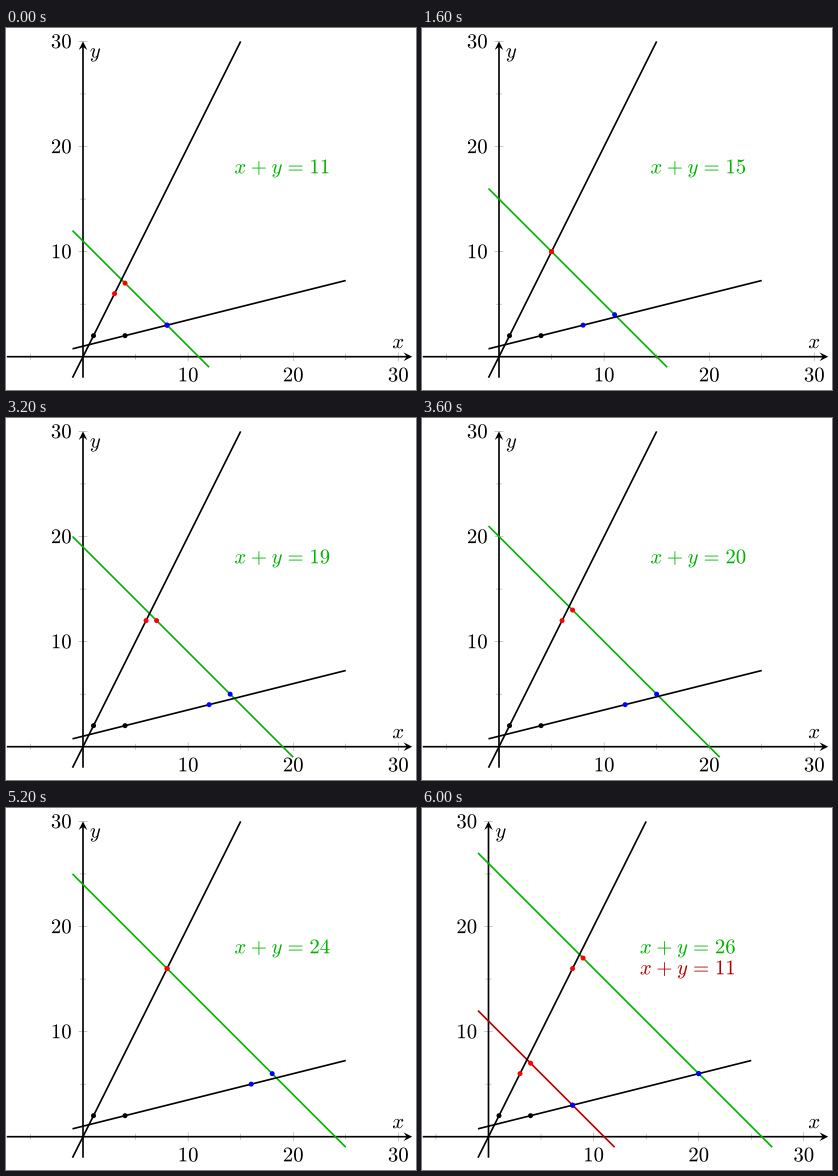
A matplotlib script for the animation above (6400 ms loop, 410 by 362 pixels).

```python
import math

import matplotlib.pyplot as plt
from matplotlib.animation import FuncAnimation
from matplotlib.patches import Circle, PathPatch, Polygon
from matplotlib.textpath import TextPath
from matplotlib.transforms import Affine2D

plt.rcParams["mathtext.fontset"] = "cm"

W, H, DPI = 410, 362, 64
UNIT = 10.51            # pixels per coordinate unit
ORIGIN_X, ORIGIN_Y = 77.0, 328.7
EM = 20.76              # font size in pixels
PT = EM / 10
THICK = 0.8 * PT
LEFT, RIGHT = 0.8, 406.2
GREEN, DARK_RED = "#00b200", "#b20000"
FIRST, LAST = 11, 26

fig = plt.figure(figsize=(W / DPI, H / DPI), dpi=DPI, facecolor="white")
ax = fig.add_axes([0, 0, 1, 1])


class Plane:
    """Maps coordinates to pixels and draws on the stage."""

    def __init__(self, x_max):
        # The view stays centred on the widest line.
        self.x0 = ORIGIN_X - max(0, x_max - 25) / 2 * UNIT

    def at(self, x, y):
        return self.x0 + x * UNIT, ORIGIN_Y - y * UNIT

    def stroke(self, p, q, color="black", width=THICK, z=2):
        ax.plot([p[0], q[0]], [p[1], q[1]], color=color, lw=width * 72 / DPI,
                solid_capstyle="butt", snap=False, zorder=z)

    def segment(self, p, q, color="black", z=3):
        self.stroke(self.at(*p), self.at(*q), color, z=z)

    def dot(self, x, y, color):
        ax.add_patch(Circle(self.at(x, y), 1.2 * PT, fc=color, lw=0, zorder=6))

    def text(self, left, base, s, color="black"):
        place = Affine2D().scale(1, -1).translate(left, base)
        path = TextPath((0, 0), f"${s}$", size=EM).transformed(place)
        ax.add_patch(PathPatch(path, fc=color, lw=0, zorder=5))

    def arrow_head(self, x, y, dx, dy):
        a = 0.52 * PT
        shape = [(0, 0), (-8, 4), (-5, 0), (-8, -4)]
        pts = [(x + a * (u * dx - v * dy), y + a * (u * dy + v * dx))
               for u, v in shape]
        ax.add_patch(Polygon(pts, fc="black", lw=0, zorder=2))

    def tick(self, value, vertical):
        major = value % 10 == 0
        half = (4.27 if major else 2.85) * PT / 2
        label_w, cap = EM, 0.644 * EM
        gap = 4.45 + 6.9
        if vertical:
            x, y = self.at(0, value)
            ends = (x - half, y), (x + half, y)
            left, base = x - gap - label_w, y + cap / 2
        else:
            x, y = self.at(value, 0)
            ends = (x, y - half), (x, y + half)
            left, base = x - label_w / 2, y + gap + cap
        self.stroke(*ends, color="#808080", width=0.2 * PT, z=1)
        if major:
            self.text(left, base, value)

    def axes(self):
        for v in (-5, 5, 10, 15, 20, 25, 30):
            self.tick(v, vertical=False)
            if v > 0:
                self.tick(v, vertical=True)
        top, bottom = self.at(0, 30), self.at(0, -2)
        self.stroke((LEFT, ORIGIN_Y), (RIGHT - 5, ORIGIN_Y))
        self.stroke(bottom, (top[0], top[1] + 5))
        self.arrow_head(RIGHT, ORIGIN_Y, 1, 0)
        self.arrow_head(*top, 0, -1)
        self.text(386.3, 320.2, "x")
        self.text(self.x0 + 6.9, 29.5, "y")

    def sum_line(self, n, color, label_y):
        self.segment((-1, n + 1), (n + 1, -1), color)
        x, y = self.at(19, label_y)
        thin, wide = r"\hspace{.053}", r"\hspace{.116}"
        label = f"x{thin}+{thin}y{wide}={wide}{n}"
        self.text(x - 2.327 * EM, y + 0.28 * EM, label, color)

    def lattice_points(self, n):
        k, j = n // 3, (n - 1) // 5
        up = math.ceil(n / 3)
        low = math.ceil((n + 4) / 5)
        for p in ((k, 2 * k), (up, n - up)):
            self.dot(*p, "red")
        for p in ((4 * j, j + 1), (n - low, low)):
            self.dot(*p, "blue")


def draw(i):
    n = FIRST + i
    ax.clear()
    ax.set(xlim=(0, W), ylim=(H, 0))
    ax.axis("off")

    plane = Plane(n + 1)
    plane.axes()
    plane.sum_line(n, GREEN, 18)
    if n == LAST:
        plane.sum_line(FIRST, DARK_RED, 16)
        plane.lattice_points(FIRST)
    plane.segment((-1, -2), (15, 30), z=4)
    plane.segment((-1, 0.75), (25, 7.25), z=4)
    plane.dot(1, 2, "black")
    plane.dot(4, 2, "black")
    plane.lattice_points(n)
    return []


anim = FuncAnimation(fig, draw, frames=LAST - FIRST + 1, interval=400,
                     init_func=lambda: [], repeat=True, repeat_delay=0)
plt.show()
```
